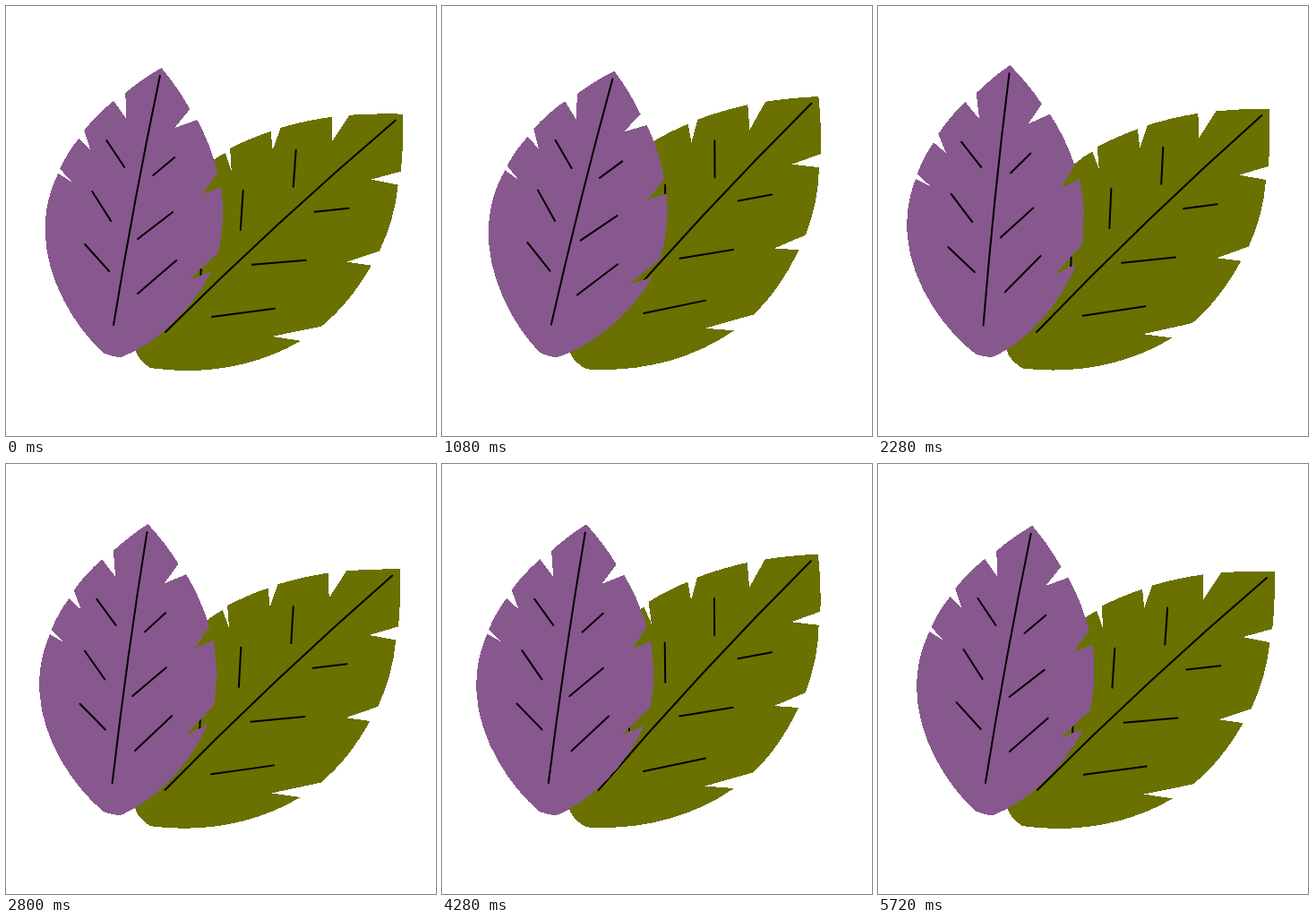
These frames come from a looping animation (480x480 px, 5.76 s). An HTML page:

```html
<!DOCTYPE html>
<html lang="en">
<head>
<meta charset="utf-8">
<title>Swaying leaves</title>
<style>
  html, body { margin: 0; width: 100%; height: 100%; overflow: hidden; background: #fff; }
  svg { display: block; width: 100%; height: 100%; }
  .blade { shape-rendering: crispEdges; }
  .vein { fill: none; stroke: #000; stroke-width: 2; stroke-linecap: round; }
</style>
</head>
<body>
<svg viewBox="0 0 480 480">
  <g id="green">
    <path class="blade" fill="#6a7100" d="M443.500 121 Q444.500 153 441 185 L408 194 L438 200
      Q434 239 417 274 L381 286 L408 290 Q384 332 352 358 L297 369 L329 374
      C276 405 215 412 161 404 Q144 392 144 380 C140 300 165 222 225 177
      Q235 169 245 164 L252 184 L250.500 159 Q272 148 296 140 L298 161 L307 136
      Q335 128 364 124 L364 152 L384 122 Q413 120 443.500 121 Z"/>
    <path class="vein" d="M435 128 Q302 241 178 364 M324 161 L321 202 M265 206 L262 250
      M220 256 L217.500 300 M383 226 L345 230 M335 284 L275 289 M300 338 L230 347"/>
  </g>
  <g id="purple">
    <path class="blade" fill="#87588d" d="M173 69 Q191 90 205 115 L188 136 L213 127
      Q228 154 236 186 L219 210 L240 202 Q245 240 237 275 L204 306 L229 296
      C208 340 165 378 131 391 Q126 394 109 387.500 C78 360 43.500 305 43.500 250
      Q43.500 216 58 187 L74 197 L60 182 Q68 164 81 148 L94 161 L87 139
      Q101 121 120 106 L134 126 L133 97 Q152 81 173 69 Z"/>
    <path class="vein" d="M171.500 78 Q143 215 120 356 M112 150 L132 180 M96 207 L117 240
      M88 266 L115 296 M188 169 L164 189 M186 230 L147 260 M190 284 L147 321"/>
  </g>
</svg>
<script>
const LOOP = 5760, STEP = 40;

// Each wave is [degrees, phase]; the n-th one swings n times per loop.
const leaves = [
  { id: 'green', pivot: '178 406', lean: -2.78,
    waves: [[.73, .66], [2.13, 1.87], [.7, 0], [.35, .68]] },
  { id: 'purple', pivot: '124 386', lean: -.77,
    waves: [[1.84, .89], [2.77, -.085], [.7, -2.6]] }
];

const sway = ({ lean, waves }, turn) => waves.reduce(
  (sum, [size, phase], i) => sum + size * Math.sin((i + 1) * turn + phase), lean);

const start = performance.now();
function draw(now) {
  const t = Math.floor(Math.max(0, now - start) % LOOP / STEP) * STEP;
  for (const leaf of leaves) {
    const angle = sway(leaf, 2 * Math.PI * t / LOOP);
    document.getElementById(leaf.id)
      .setAttribute('transform', `rotate(${angle.toFixed(3)} ${leaf.pivot})`);
  }
  requestAnimationFrame(draw);
}
draw(start);
</script>
</body>
</html>
```
